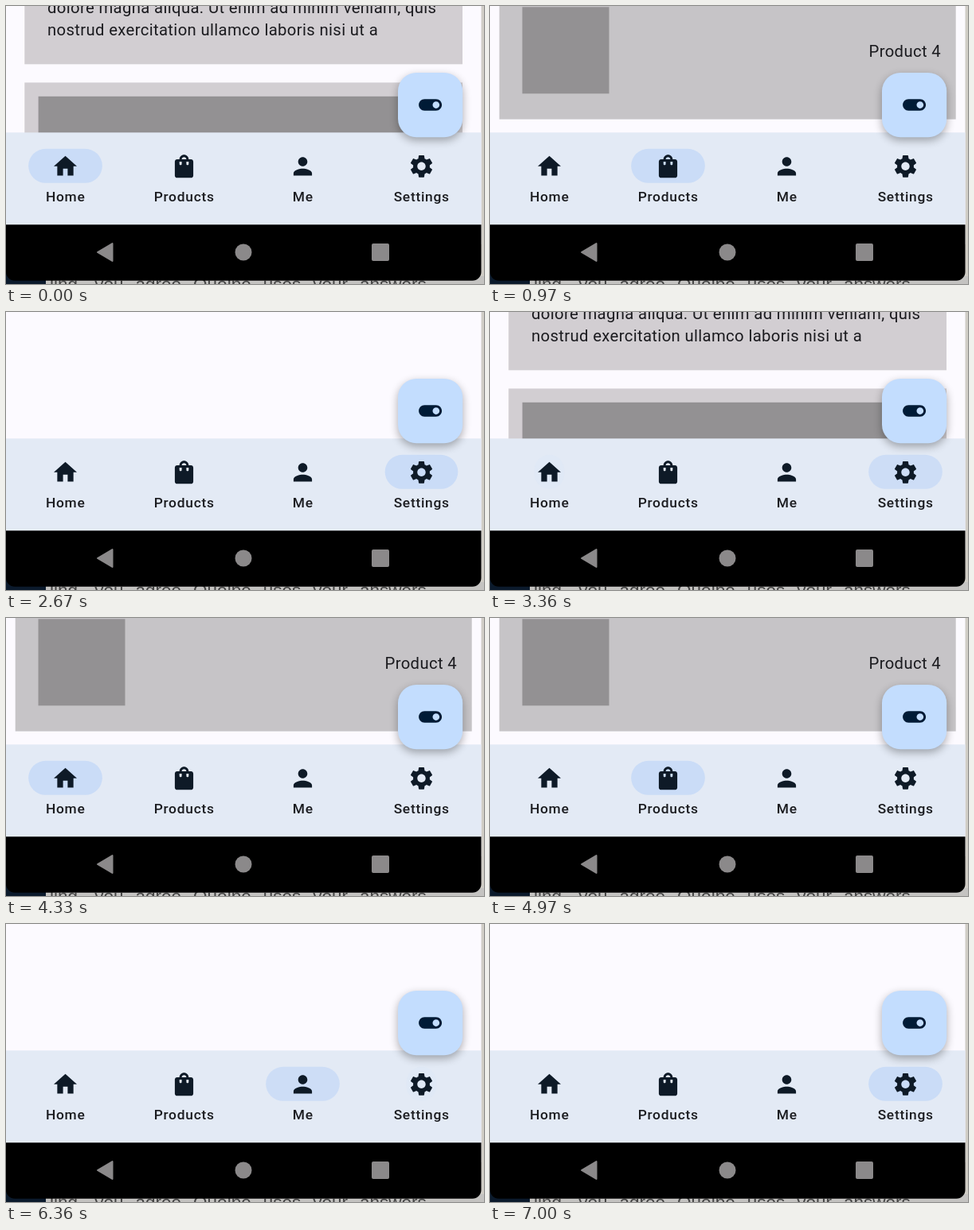
An HTML page with a canvas for the animation above (7.18 s loop, 600 px wide and 350 px high).

```html
<!DOCTYPE html>
<html lang="en">
<head>
<meta charset="utf-8">
<title>Bottom navigation</title>
<style>
  html, body { margin: 0; width: 100%; height: 100%; overflow: hidden; }
  canvas { display: block; width: 600px; height: 350px; }
</style>
</head>
<body>
<canvas id="stage" width="600" height="350"></canvas>
<script>
const ctx = document.getElementById('stage').getContext('2d');
const LOOP = 7180;
const DP = 1.4487;
const INK = '#0e1a27';

const icons = {
  home: 'M10 20v-6h4v6h5v-8h3L12 3 2 12h3v8z',
  bag: 'M18 6h-2c0-2.21-1.79-4-4-4S8 3.79 8 6H6c-1.1 0-2 .9-2 2v12c0 1.1.9 2 2 2h12c1.1 0 2-.9 2-2V8c0-1.1-.9-2-2-2z' +
    'm-8 4c0 .55-.45 1-1 1s-1-.45-1-1V8h2v2zm2-6c1.1 0 2 .9 2 2h-4c0-1.1.9-2 2-2zm4 6c0 .55-.45 1-1 1s-1-.45-1-1V8h2v2z',
  person: 'M12 12c2.21 0 4-1.79 4-4s-1.79-4-4-4-4 1.79-4 4 1.79 4 4 4zm0 2c-2.67 0-8 1.34-8 4v2h16v-2c0-2.66-5.33-4-8-4z',
  gear: 'M19.14 12.94c.04-.3.06-.61.06-.94 0-.32-.02-.64-.07-.94l2.03-1.58c.18-.14.23-.41.12-.61l-1.92-3.32' +
    'c-.12-.22-.37-.29-.59-.22l-2.39.96c-.5-.38-1.03-.7-1.62-.94l-.36-2.54c-.04-.24-.24-.41-.48-.41h-3.84' +
    'c-.24 0-.43.17-.47.41l-.36 2.54c-.59.24-1.13.57-1.62.94l-2.39-.96c-.22-.08-.47 0-.59.22L2.74 8.87' +
    'c-.12.21-.08.47.12.61l2.03 1.58c-.05.3-.09.63-.09.94s.02.64.07.94l-2.03 1.58c-.18.14-.23.41-.12.61' +
    'l1.92 3.32c.12.22.37.29.59.22l2.39-.96c.5.38 1.03.7 1.62.94l.36 2.54c.05.24.24.41.48.41h3.84' +
    'c.24 0 .44-.17.47-.41l.36-2.54c.59-.24 1.13-.56 1.62-.94l2.39.96c.22.08.47 0 .59-.22l1.92-3.32' +
    'c.12-.22.07-.47-.12-.61l-2.01-1.58zM12 15.6c-1.98 0-3.6-1.62-3.6-3.6s1.62-3.6 3.6-3.6 3.6 1.62 3.6 3.6-1.62 3.6-3.6 3.6z',
  toggle: 'M17 7H7c-2.76 0-5 2.24-5 5s2.24 5 5 5h10c2.76 0 5-2.24 5-5s-2.24-5-5-5zm0 8c-1.66 0-3-1.34-3-3s1.34-3 3-3 3 1.34 3 3-1.34 3-3 3z'
};
for (const name in icons) icons[name] = new Path2D(icons[name]);

const tabs = [
  { label: 'Home', icon: icons.home, page: drawHome },
  { label: 'Products', icon: icons.bag, page: drawProducts },
  { label: 'Me', icon: icons.person },
  { label: 'Settings', icon: icons.gear }
];

// lead: how far the pill has already moved when the page swaps
const taps = [
  { at: 330, tab: 1, lead: 0 },
  { at: 1330, tab: 2, lead: 0 },
  { at: 2360, tab: 3, lead: 15 },
  { at: 3360, tab: 0, lead: 15 },
  { at: 4330, tab: 1, lead: 0 },
  { at: 5360, tab: 2, lead: 15 },
  { at: 6360, tab: 3, lead: 15 }
];

const clamp = v => Math.min(1, Math.max(0, v));

function cubic(a, b, c, d, x) {
  const at = (p1, p2, u) => 3 * p1 * u * (1 - u) ** 2 + 3 * p2 * u * u * (1 - u) + u ** 3;
  let lo = 0, hi = 1;
  for (let i = 0; i < 24; i++) {
    const mid = (lo + hi) / 2;
    if (at(a, c, mid) < x) lo = mid; else hi = mid;
  }
  return at(b, d, lo);
}

// Emphasized ease: two cubics joined at (1/6, 0.4)
function emphasized(x) {
  const mx = 0.166666, my = 0.4;
  if (x <= 0) return 0;
  if (x >= 1) return 1;
  if (x < mx) return my * cubic(0.05 / mx, 0, 0.133333 / mx, 0.06 / my, x / mx);
  const sx = 1 - mx, sy = 1 - my;
  return my + sy * cubic((0.208333 - mx) / sx, (0.82 - my) / sy, (0.25 - mx) / sx, 1, (x - mx) / sx);
}

function rect(x, y, w, h, color) {
  ctx.fillStyle = color;
  ctx.fillRect(x, y, w, h);
}

function round(x, y, w, h, r, color) {
  ctx.fillStyle = color;
  ctx.beginPath();
  ctx.roundRect(x, y, w, h, r);
  ctx.fill();
}

function text(str, x, y, sp, spacing, weight = 400) {
  ctx.font = `${weight} ${sp * DP}px Roboto, sans-serif`;
  ctx.letterSpacing = spacing * DP + 'px';
  ctx.fillText(str, x, y);
  ctx.letterSpacing = '0px';
}

function icon(path, cx, cy, color) {
  ctx.save();
  ctx.translate(cx, cy);
  ctx.scale(DP, DP);
  ctx.translate(-12, -12);
  ctx.fillStyle = color;
  ctx.fill(path);
  ctx.restore();
}

function drawBackdrop() {
  rect(0, 0, 600, 350, '#d0cdc6');
  rect(50, 340, 550, 10, '#c4c3c1');
  rect(0, 330, 50, 20, '#0b1a2c');
  ctx.fillStyle = '#444';
  ctx.font = '22.5px "Liberation Sans", Arial, sans-serif';
  let x = 55;
  for (const word of 'ling, you agree Quolpe uses your answers'.split(' ')) {
    ctx.fillText(word, x, 357.5);
    x += ctx.measureText(word).width + 15;
  }
}

function drawHome() {
  rect(23.3, 0, 549.7, 73.3, '#d2ced2');
  rect(23.3, 96.4, 549.7, 70, '#d2ced2');
  rect(40.6, 113.8, 515, 50, '#939193');
  ctx.fillStyle = '#1b1b1f';
  text('dolore magna aliqua. Ut enim ad minim veniam, quis', 52, 8.5, 14, 0.25);
  text('nostrud exercitation ullamco laboris nisi ut a', 52, 37.3, 14, 0.25);
}

function drawProducts() {
  rect(11.7, 0, 573, 142.6, '#c6c4c7');
  rect(40.5, 1.3, 109, 109, '#939193');
  ctx.fillStyle = '#1b1b1f';
  text('Product 4', 475.5, 63.6, 14, 0.25);
}

function drawPill(cx, grow, alpha) {
  if (alpha <= 0) return;
  const w = 64 * DP * (0.4 + 0.6 * emphasized(grow));
  ctx.globalAlpha = alpha;
  round(cx - w / 2, 179.8, w, 43, Math.min(21.5, w / 2), '#cadcf7');
  ctx.globalAlpha = 1;
}

function drawNav(now, last, elapsed) {
  rect(0, 159.3, 596.5, 116, '#e3eaf5');
  const grow = clamp(elapsed / 500), fade = clamp(elapsed / 100);
  tabs.forEach((tab, i) => {
    const cx = 74.5 + 149 * i;
    if (i === now) drawPill(cx, grow, fade);
    else if (i === last) drawPill(cx, 1 - grow, 1 - fade);
    icon(tab.icon, cx, 201.8, INK);
    ctx.fillStyle = '#1b1c20';
    ctx.textAlign = 'center';
    text(tab.label, cx + 0.2, 246, 12, 0.5, 500);
    ctx.textAlign = 'left';
  });
}

function drawSystemBar() {
  round(0, 275.2, 596.5, 70.6, [0, 0, 11, 11], '#000');
  const grey = '#8b898a';
  ctx.fillStyle = grey;
  ctx.strokeStyle = grey;
  ctx.lineJoin = 'round';
  ctx.lineWidth = 2;
  ctx.beginPath();
  ctx.moveTo(115, 310);
  ctx.lineTo(133.5, 299);
  ctx.lineTo(133.5, 321);
  ctx.closePath();
  ctx.fill();
  ctx.stroke();
  ctx.beginPath();
  ctx.arc(298, 310, 10.5, 0, Math.PI * 2);
  ctx.fill();
  round(459, 299, 22, 22, 2, grey);
}

function drawFab() {
  ctx.save();
  ctx.shadowColor = 'rgba(0,0,0,0.32)';
  ctx.shadowBlur = 11;
  ctx.shadowOffsetY = 4;
  round(492, 84, 81.2, 81.2, 23.2, '#c3ddfe');
  ctx.restore();
  icon(icons.toggle, 532.6, 124.6, '#001b36');
}

function draw(t) {
  let now = 0, last = -1, elapsed = 1000;
  for (const tap of taps) {
    if (t < tap.at) break;
    last = now;
    now = tap.tab;
    elapsed = t - tap.at + tap.lead;
  }
  drawBackdrop();
  rect(0, 0, 596.5, 300, '#fcfaff');
  if (tabs[now].page) tabs[now].page();
  drawNav(now, last, elapsed);
  drawSystemBar();
  drawFab();
}

const start = performance.now();
function tick() {
  draw((performance.now() - start) % LOOP);
  requestAnimationFrame(tick);
}
tick();
</script>
</body>
</html>
```
